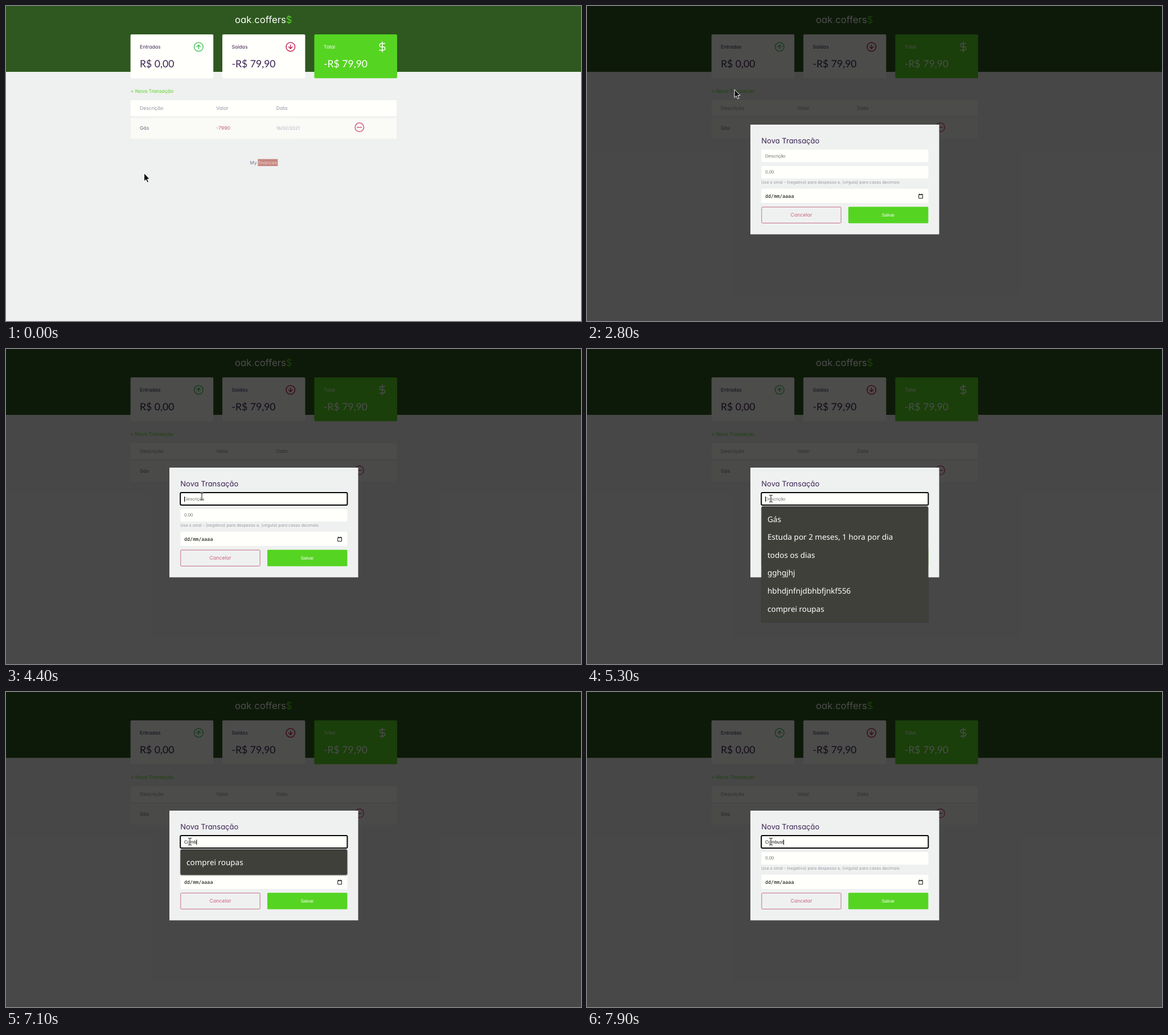
These frames come from a looping animation (1010x555 px, 8000 ms). An HTML page:

```html
<!DOCTYPE html>
<html lang="pt-BR">
<head>
<meta charset="utf-8">
<title>Finanças</title>
<style>
  html, body { margin: 0; width: 100%; height: 100%; overflow: hidden; background: #eff0f0; }
  svg { display: block; width: 1010px; height: 555px; }
  text { font: 8.6px Inter, sans-serif; font-feature-settings: "cv11"; text-rendering: geometricPrecision; white-space: pre; }
  .money { font: 17.6px Lato, sans-serif; }
  .logo { font-size: 16.7px; }
  .field { font: 8px "Liberation Sans", Arial, sans-serif; }
  .option { font: 500 13.5px "Noto Sans", sans-serif; fill: #fff; }
  .icon { fill: none; stroke-width: 1.5; stroke-linecap: round; stroke-linejoin: round; }
  .cursor { stroke-linejoin: round; }
</style>
</head>
<body>
<svg viewBox="0 0 1010 555">
  <rect width="1010" height="555" fill="#eff0f0"/>
  <rect width="1010" height="116" fill="#2e581f"/>
  <text class="logo" x="402" y="29.5" fill="#fff">oak<tspan fill="#56d422">.</tspan>coffers<tspan fill="#56d422">$</tspan></text>

  <g fill="#fffffb">
    <rect x="218.7" y="50" width="145.5" height="77.3" rx="2"/>
    <rect x="380" y="50" width="145.5" height="77.3" rx="2"/>
    <rect x="541.5" y="50" width="145.5" height="77.3" rx="2" fill="#56d422"/>
    <rect x="218.7" y="166" width="467.5" height="28.3" rx="2"/>
  </g>
  <g fill="#3b2352">
    <text x="235" y="75">Entradas</text>
    <text x="396.5" y="75">Saídas</text>
    <text x="558" y="75" fill="#fff">Total</text>
    <text class="money" x="235" y="108.3">R$ 0,00</text>
    <text class="money" x="396.5" y="108.3">-R$ 79,90</text>
    <text class="money" x="558" y="108.3" fill="#fff">-R$ 79,90</text>
  </g>
  <g class="icon">
    <g transform="translate(338.3 72)" stroke="#4cc763"><circle r="7.8"/><path d="M0 3.3V-3.3M-3.2 0L0-3.3L3.2 0"/></g>
    <g transform="translate(499.8 72)" stroke="#c4275c"><circle r="7.8"/><path d="M0-3.3V3.3M-3.2 0L0 3.3L3.2 0"/></g>
    <path transform="translate(661 72)" stroke="#fff" stroke-width="1.4" d="M0-9V9M4.5-5.7H-2a2.85 2.85 0 0 0 0 5.7H2a2.85 2.85 0 0 1 0 5.7H-5"/>
  </g>

  <text id="link" x="218.7" y="153">+ Nova Transação</text>
  <g fill="#968fa3">
    <text x="235" y="183">Descrição</text>
    <text x="369.3" y="183">Valor</text>
    <text x="474.7" y="183">Data</text>
  </g>
  <g id="row">
    <rect x="218.7" y="197.3" width="467.5" height="36.5" rx="2" fill="#fffffb"/>
    <text x="235" y="218" fill="#392c4c">Gás</text>
    <text x="369.3" y="218" fill="#b01c50">-7990</text>
    <text x="474.7" y="218" fill="#969cb3" style="font-size:7.9px">16/02/2021</text>
    <g class="icon" stroke="#c4205c" transform="translate(620.8 213.8)"><circle r="7.7"/><path d="M-4 0H4"/></g>
  </g>

  <rect x="442.3" y="269.7" width="35" height="12.3" fill="#c68780"/>
  <text x="428.6" y="278.8" fill="#7b7490" style="font-size:8.2px">My <tspan fill="#eed3ce">finances</tspan></text>

  <g id="modal">
    <rect width="1010" height="555" fill="#000" fill-opacity=".7"/>
    <rect x="287" y="209" width="331.6" height="193.3" fill="#eff1f1"/>
    <text x="306.3" y="242" fill="#3b2352" style="font-size:13px">Nova Transação</text>
    <g fill="#fffffb">
      <rect x="306.3" y="253" width="293.2" height="22" rx="1.5"/>
      <rect x="306.3" y="282" width="293.2" height="22" rx="1.5"/>
      <rect x="306.3" y="322" width="293.2" height="25" rx="1.5"/>
    </g>
    <rect id="focus" x="306.2" y="253.1" width="293.3" height="21.8" rx="2" fill="none" stroke="#050505" stroke-width="2"/>
    <text id="placeholder" class="field" x="313" y="267.3" fill="#757575">Descrição</text>
    <text id="typed" class="field" x="313" y="267.3" fill="#111"></text>
    <rect id="caret" y="260" width="1" height="9.3"/>
    <text class="field" x="313" y="295.3" fill="#757575">0,00</text>
    <text x="306.3" y="313" fill="#99979f" style="font-size:7.15px">Use o sinal - (negativo) para despesas e, (vírgula) para casas decimais</text>
    <text x="313" y="338.2" style="font:8.4px 'DejaVu Sans Mono',monospace">dd/mm/aaaa</text>
    <path d="M582.8 332.2H589.6V338.8H582.8ZM582.8 332.6H589.6M584.3 330.6V332M588.1 330.6V332" fill="none" stroke="#111"/>
    <rect x="306.8" y="354.2" width="139.4" height="28.2" rx="1.5" fill="none" stroke="#c66f85"/>
    <text x="376.5" y="371" fill="#c9647f" text-anchor="middle" style="font-size:8.8px">Cancelar</text>
    <rect x="459" y="353.8" width="140.5" height="29" rx="1.5" fill="#56d422"/>
    <text class="field" x="529" y="371" fill="#fff" text-anchor="middle">Salvar</text>
    <g id="list">
      <rect id="shade" x="305.3" y="278" width="295.2" rx="4" fill="#000" fill-opacity=".14"/>
      <rect id="panel" x="306.3" y="277" width="293.2" rx="3" fill="#40403b"/>
      <g id="options"></g>
    </g>
  </g>

  <g id="arrow" class="cursor"><path d="M0 0V14.5L3.3 11.4L5.6 16.6L8 15.6L5.8 10.5H10Z" fill="#111" stroke="#fff"/></g>
  <g id="hand" class="cursor"><path d="M2.2 8.4V1.2a1.2 1.2 0 0 1 2.4 0V5.3L10.4 6.3Q11.8 6.7 11.6 8.2L10.8 11.5V14H4.5V12.6L-.8 8.4Q-.8 6.8 .7 7.1Z" fill="#fff" stroke="#222" stroke-width="1.1"/></g>
  <g id="beam" class="cursor" fill="none">
    <path d="M-3-6H-1L0-5.3L1-6H3M0-5.3V5.3M-3 6H-1L0 5.3L1 6H3" stroke="#fff" stroke-width="2.6" stroke-opacity=".8"/>
    <path d="M-3-6H-1L0-5.3L1-6H3M0-5.3V5.3M-3 6H-1L0 5.3L1 6H3" stroke="#111"/>
  </g>
</svg>
<script>
const LOOP = 8000, TICK = 100;
const $ = id => document.getElementById(id);
const show = (id, on) => $(id).style.display = on ? '' : 'none';
const within = (v, lo, hi) => v >= lo && v < hi;

// Pointer path: time, x, y
const path = [
  [0, 242.5, 294.5], [300, 242.5, 294.5], [500, 261, 254], [600, 261, 254],
  [1100, 262, 200], [1500, 259, 147], [2900, 259, 147], [3000, 261, 149], [3100, 261, 149],
  [3400, 440, 225], [3700, 578, 289], [4000, 440, 262], [4200, 380, 260],
  [4300, 380, 260], [4400, 344, 260], [4500, 323, 263.5], [LOOP, 323, 263.5]
];
const word = 'Combust';
const keyTimes = [5800, 6600, 6800, 7100, 7400, 7600, 7900];
const suggestions = ['Gás', 'Estuda por 2 meses, 1 hora por dia', 'todos os dias',
  'gghgjhj', 'hbhdjnfnjdbhbfjnkf556', 'comprei roupas'];

function pointerAt(t) {
  const i = path.findIndex(p => p[0] > t);
  const [t0, x0, y0] = path[i - 1], [t1, x1, y1] = path[i];
  const k = (t - t0) / (t1 - t0);
  return [x0 + (x1 - x0) * k, y0 + (y1 - y0) * k];
}

let listed = null;
function fillList(items) {
  const key = items.join();
  if (key === listed) return;
  listed = key;
  const height = 14 + items.length * 31.6;
  $('panel').setAttribute('height', height);
  $('shade').setAttribute('height', height + 1);
  $('options').replaceChildren(...items.map((item, i) => {
    const text = document.createElementNS('http://www.w3.org/2000/svg', 'text');
    text.setAttribute('class', 'option');
    text.setAttribute('x', 317);
    text.setAttribute('y', 304.6 + i * 31.6);
    text.textContent = item;
    return text;
  }));
}

function drawPointer(t, open) {
  const [x, y] = pointerAt(t);
  const onLink = !open && within(x, 218, 294) && within(y, 143, 158);
  const onField = open && within(x, 306, 600) && (within(y, 253, 275) || within(y, 282, 304));
  const shape = onLink ? 'hand' : onField ? 'beam' : 'arrow';
  for (const id of ['arrow', 'hand', 'beam']) show(id, id === shape);
  $(shape).setAttribute('transform', `translate(${x} ${y})`);
  $('link').setAttribute('fill', onLink ? '#6ff53c' : '#56d422');
  $('row').setAttribute('opacity', !open && within(y, 197, 234) ? 1 : .7);
}

function drawForm(t) {
  const value = word.slice(0, keyTimes.filter(k => k <= t).length);
  show('focus', t >= 4100);
  show('placeholder', !value);
  $('typed').textContent = value;
  show('caret', t >= 4100 && !within(t, 5000, 5300) && !within(t, 6400, 6600));
  $('caret').setAttribute('x', 313 + (value ? $('typed').getComputedTextLength() : 0));

  show('list', within(t, 4500, 7400));
  $('list').setAttribute('opacity', t < 7200 ? 1 : t < 7300 ? .5 : .15);
  fillList(value ? suggestions.slice(-1) : suggestions);
}

function frame() {
  const t = Math.floor(performance.now() % LOOP / TICK) * TICK;
  const open = t >= 2800;
  show('modal', open);
  if (open) drawForm(t);
  drawPointer(t, open);
  requestAnimationFrame(frame);
}
frame();
</script>
</body>
</html>
```
